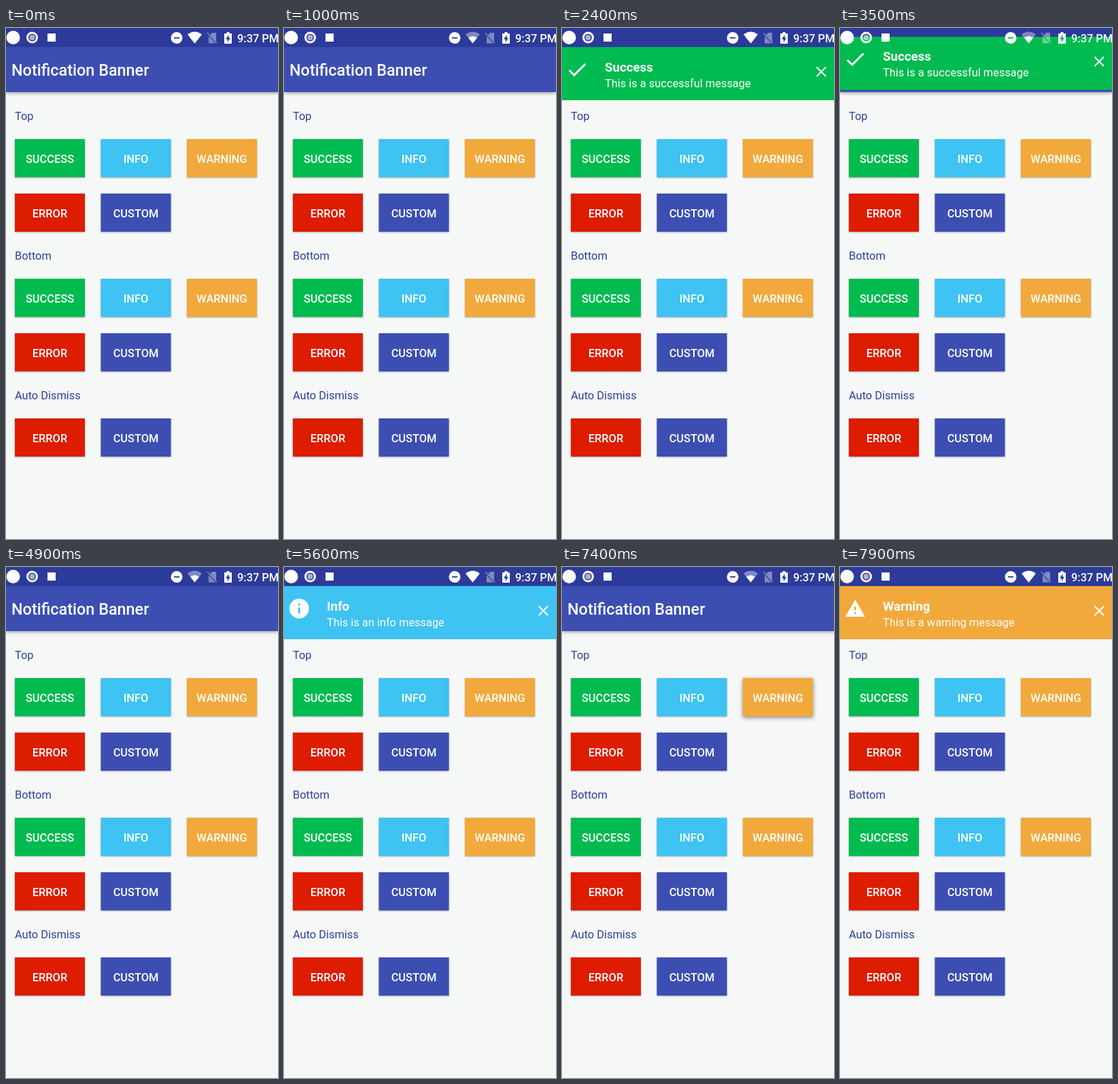
Animation, 400 px wide and 750 px high, one loop 8000 ms. Source, as an HTML page:

```html
<!DOCTYPE html>
<html lang="en">
<head>
<meta charset="utf-8">
<title>Notification Banner</title>
<style>
  html, body { margin: 0; width: 100%; height: 100%; overflow: hidden; }
  svg { display: block; width: 400px; height: 750px; background: #f6f8f7; }
  text { font: 16.4px Roboto, Arial, sans-serif; fill: #fff; }
  .medium { font-weight: 500; }
  .middle { text-anchor: middle; }
  .label { fill: #2f3f9b; }
  .title { font-size: 23.4px; font-weight: 500; }
  .head { font-size: 18.7px; font-weight: 700; }
  .button rect { filter: drop-shadow(0 1.2px 1.2px #0005); }
  .button.raised rect { filter: drop-shadow(0 2px 3px #0007); }
  .bar { filter: drop-shadow(0 2px 2px #0005); }
</style>
</head>
<body>
<svg viewBox="0 0 400 750">
  <rect class="bar" y="28" width="400" height="66" fill="#3c4eb2"/>
  <rect width="400" height="28" fill="#2c3b99"/>
  <text class="title" x="8" y="70.3">Notification Banner</text>
  <g id="content"></g>
  <g id="banner">
    <rect id="back" y="28" width="400" height="78"/>
    <path id="icon" fill="#fff" fill-rule="evenodd"/>
    <text class="head" id="head" x="63" y="63.5"></text>
    <text id="message" x="63" y="86.5"></text>
    <path d="M374.500 57.500l13.500 13.500m0-13.500l-13.500 13.500" stroke="#fff" stroke-width="2.100"/>
  </g>
  <g fill="#fff">
    <circle cx="10.500" cy="14" r="10"/>
    <circle cx="38.500" cy="14" r="7" fill="none" stroke="#fff" stroke-width="3"/>
    <circle cx="38.500" cy="14" r="4" opacity=".6"/>
    <rect x="61" y="8" width="12" height="12"/>
    <path fill-rule="evenodd" d="M242.500 14.500a8.500 8.500 0 0 1 17 0a8.500 8.500 0 0 1-17 0zM247 13.500h8v2h-8z"/>
    <path id="wifi" d="M277.500 22.500L267 9.500Q277.500 1.500 288 9.500z"/>
    <path d="M277.500 22.500L271 14.500Q277.500 9.500 284 14.500z"/>
    <g opacity=".4">
      <path d="M303 7h6v13l-9-9.500zM298 12l10 10.500h-10z"/>
      <path d="M296 7l14 15" stroke="#fff" stroke-width="1.500"/>
    </g>
    <path fill-rule="evenodd" d="M321 8h3.500v-2h4v2h3.500v15h-11zM327.500 10l-4.500 6.500h2.800v4.500l4.300-6.500h-2.600z"/>
    <text class="medium" x="340" y="20.500">9:37 PM</text>
  </g>
</svg>
<script>
const $ = id => document.getElementById(id);
const kinds = [
  ["SUCCESS", "#00bb4f"], ["INFO", "#3ec3f3"], ["WARNING", "#f1a93c"],
  ["ERROR", "#dd1c00"], ["CUSTOM", "#3c4eb2"]
];

// Each section: heading, heading baseline, index of its first button kind
const sections = [["Top", 135, 0], ["Bottom", 340, 0], ["Auto Dismiss", 545, 3]];
$("content").innerHTML = sections.map(([name, y, first]) =>
  `<text class="label" x="13" y="${y}">${name}</text>` +
  kinds.slice(first).map(([text, color], i) => {
    const x = 13 + i % 3 * 126.5, top = y + 28 + Math.floor(i / 3) * 80;
    return `<g class="button"><rect x="${x}" y="${top}" width="103" height="56" fill="${color}"/>
      <text class="medium middle" x="${x + 51.5}" y="${top + 34.5}">${text}</text></g>`;
  }).join("")).join("");

const banners = [
  { kind: 0, enter: 1812, leave: 3434, head: "Success", message: "This is a successful message",
    size: 1.46, icon: "M9 16.170L4.830 12l-1.420 1.410L9 19 21 7l-1.410-1.410z" },
  { kind: 1, enter: 5012, leave: 6534, press: 5000, head: "Info", message: "This is an info message",
    size: 1.44, icon: "M2 12a10 10 0 0 1 20 0a10 10 0 0 1-20 0zM11 11h2v6h-2zM11 7h2v2h-2z" },
  { kind: 2, enter: 7412, leave: 9000, press: 7400, head: "Warning", message: "This is a warning message",
    size: 1.32, icon: "M1 21h22L12 2zM11 16h2v2h-2zM11 10h2v4h-2z" }
];
const height = 78, enterTime = 300, leaveTime = 150;
const weakSignal = [[900, 1900], [2900, 3900], [4900, 5500], [6900, 7900]];
const buttons = document.querySelectorAll(".button");

function slide(b, t) {
  const rest = Math.max(0, 1 - (t - b.enter) / enterTime);
  const gone = Math.max(0, (t - b.leave) / leaveTime);
  return -height * (rest ** 2 + gone ** 2);
}

function draw(now) {
  const t = Math.floor(now % 8000 / 100) * 100; // ten steps a second
  const b = banners.find(b => t >= b.enter && t < b.leave + leaveTime);
  $("banner").style.display = b ? "" : "none";
  if (b) {
    $("banner").setAttribute("transform", `translate(0 ${slide(b, t)})`);
    $("back").setAttribute("fill", kinds[b.kind][1]);
    $("icon").setAttribute("d", b.icon);
    $("icon").setAttribute("transform", `translate(22.300 61) scale(${b.size}) translate(-12 -12)`);
    $("head").textContent = b.head;
    $("message").textContent = b.message;
  }
  for (const { kind, press } of banners)
    buttons[kind].classList.toggle("raised", t === press);
  const weak = weakSignal.some(([from, to]) => t >= from && t < to);
  $("wifi").setAttribute("opacity", weak ? .4 : 1);
}

const start = performance.now();
function tick() {
  draw(performance.now() - start);
  requestAnimationFrame(tick);
}
tick();
</script>
</body>
</html>
```
